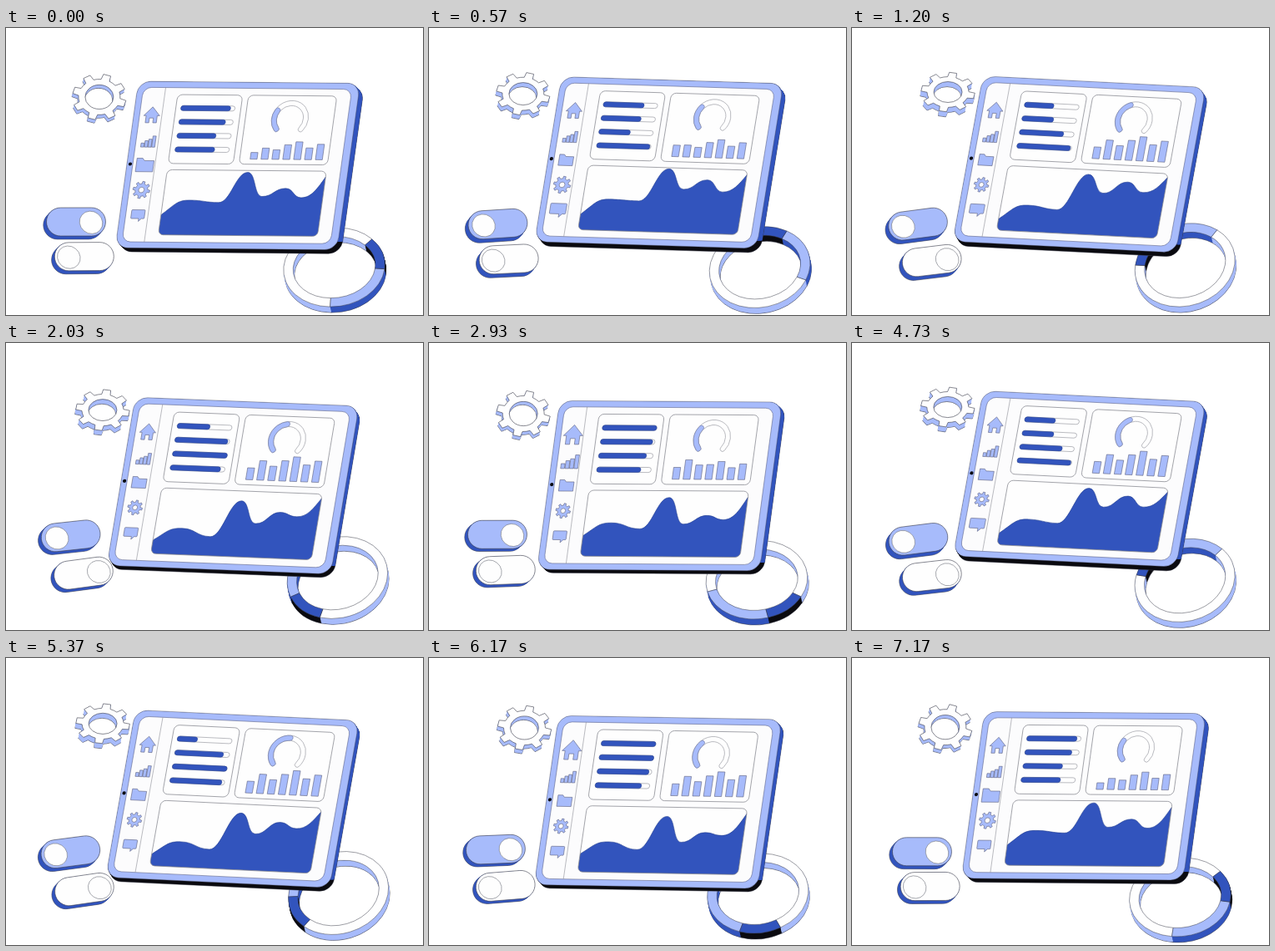
An HTML page with a canvas for the animation above (7210 ms loop, 500 by 345 pixels).

```html
<!DOCTYPE html>
<html lang="en">
<head>
<meta charset="utf-8">
<title>Floating dashboard</title>
<style>
  html, body { margin: 0; width: 100%; height: 100%; overflow: hidden; background: #fff; }
  canvas { display: block; width: 500px; height: 345px; }
</style>
</head>
<body>
<canvas id="stage"></canvas>
<script>
const PERIOD = 3605;
const TAU = Math.PI * 2, DEG = Math.PI / 180;
const WHITE = '#fefefe', LIGHT = '#a7bbfb', BLUE = '#3254bd', BLACK = '#0b0b10';
const LINE = '#3a3c48', GREY = '#8c8d95';

const canvas = document.getElementById('stage');
const ctx = canvas.getContext('2d');
const ratio = window.devicePixelRatio || 1;
canvas.width = 500 * ratio;
canvas.height = 345 * ratio;

// Timing helpers; p is the phase of the loop, 0 to 1.
const wave = (p, mid, amp, peak) => mid + amp * Math.cos(TAU * (p - peak));
const clamp = (v, lo = 0, hi = 1) => Math.min(hi, Math.max(lo, v));
const smooth = v => { v = clamp(v); return v * v * (3 - 2 * v); };
const ramp = (p, from, to) => smooth((p - from) / (to - from));

// Smooth periodic curve through [phase, value] keys.
function track(p, keys) {
  const n = keys.length;
  const at = i => {
    const turn = Math.floor(i / n), k = keys[i - turn * n];
    return [k[0] + turn, k[1]];
  };
  let i = n - 1;
  while (i > 0 && keys[i][0] > p) i--;
  const [a, b, c, d] = [at(i - 1), at(i), at(i + 1), at(i + 2)];
  const h = c[0] - b[0], s = (p - b[0]) / h, s2 = s * s, s3 = s2 * s;
  const m0 = (c[1] - a[1]) / (c[0] - a[0]) * h;
  const m1 = (d[1] - b[1]) / (d[0] - b[0]) * h;
  return (2 * s3 - 3 * s2 + 1) * b[1] + (s3 - 2 * s2 + s) * m0
       + (3 * s2 - 2 * s3) * c[1] + (s3 - s2) * m1;
}

// Path helpers
const shape = d => new Path2D(d);
function rect(x, y, w, h, r = 0) {
  const path = new Path2D();
  path.roundRect(x, y, w, h, r);
  return path;
}
function ellipse(x, y, rx, ry, turn = 0) {
  const path = new Path2D();
  path.ellipse(x, y, rx, ry, turn, 0, TAU);
  return path;
}
function put(path, matrix) {
  const placed = new Path2D();
  placed.addPath(path, matrix);
  return placed;
}
function paint(path, fill, line, width = 0.6) {
  if (fill) { ctx.fillStyle = fill; ctx.fill(path, 'evenodd'); }
  if (line) { ctx.strokeStyle = line; ctx.lineWidth = width; ctx.stroke(path); }
}
function extrude(path, dx, dy, fill, outline = true) {
  const steps = Math.ceil(Math.hypot(dx, dy) * 1.5);
  for (let i = steps; i > 0; i--) {
    ctx.save();
    ctx.translate(dx * i / steps, dy * i / steps);
    paint(path, fill, outline && i === steps ? LINE : null);
    ctx.restore();
  }
}
function gearPath(outer, root, hole, turn) {
  const path = new Path2D();
  for (let i = 0; i < 8; i++) {
    const a = turn + i * 45;
    path.arc(0, 0, root, (a - 33) * DEG, (a - 12) * DEG);
    for (const side of [-8, 8]) {
      path.lineTo(outer * Math.cos((a + side) * DEG), outer * Math.sin((a + side) * DEG));
    }
  }
  path.closePath();
  path.moveTo(hole, 0);
  path.arc(0, 0, hole, 0, TAU);
  path.closePath();
  return path;
}

function ringPart(from, to, ry) {
  const path = new Path2D();
  path.ellipse(0, 0, 61, ry, 0, from * DEG, to * DEG);
  path.ellipse(0, 0, 49.5, ry - 10.5, 0, to * DEG, from * DEG, true);
  path.closePath();
  return path;
}
function drawRing(p) {
  const ry = wave(p, 48, 1, 0.39);
  const place = new DOMMatrix()
    .translate(wave(p, 396, 3.4, 0.38), wave(p, 285, 3, 0.08))
    .rotate(wave(p, -12, -6, 0.39));
  const turn = wave(p, 4, 3, 0.75) - 360 * p;
  const split = wave(p, 90, 8, -0.1);
  // [start, end, face colour, side colour]
  const parts = [
    [split, 320, WHITE, LIGHT],
    [8, split, LIGHT, BLUE],
    [-40, 8, BLUE, BLACK]
  ].map(([from, to, face, side]) =>
    ({ path: put(ringPart(from + turn, to + turn, ry), place), face, side }));
  const steps = 10, dx = 1.5, dy = 7;
  for (let i = steps; i > 0; i--) {
    ctx.save();
    ctx.translate(dx * i / steps, dy * i / steps);
    for (const s of parts) paint(s.path, s.side, i === steps ? LINE : null);
    ctx.restore();
  }
  for (const s of parts) paint(s.path, s.face, LINE, 0.5);
}

function drawGear(p) {
  const tilt = wave(p, 0.8, 0.07, -0.1);
  const place = new DOMMatrix([1, 0, 0, tilt, wave(p, 114, -2.1, 0), wave(p, 81, -4, 0.33)]);
  const path = put(gearPath(32.3, 25, 17, wave(p, 13, 4, 0)), place);
  extrude(path, -1, wave(p, 5, -1.2, -0.1), LIGHT);
  paint(path, WHITE, LINE);
}

function drawToggle(p, x, y, angle, knob, fill) {
  const place = new DOMMatrix().translate(x, y).rotate(angle);
  const body = put(rect(-35.5, -17, 71, 34, 17), place);
  extrude(body, -3.7, wave(p, 3.9, 0.8, 0.25), BLUE);
  paint(body, fill, LINE);
  paint(put(ellipse(knob, 0.8, 14.2, 13.2, 0.7), place), WHITE, '#6b6d78');
}
function drawToggles(p) {
  const first = 18 - 36 * (ramp(p, 0.05, 0.17) - ramp(p, 0.55, 0.67));
  const second = -18.5 + 37 * (ramp(p, 0.16, 0.28) - ramp(p, 0.56, 0.68));
  drawToggle(p, wave(p, 80.7, 3.3, 0), wave(p, 233, 3, 0.25),
    wave(p, -3.7, -4.3, 0.41), first, LIGHT);
  drawToggle(p, wave(p, 93.8, 2.2, 0.25), wave(p, 276.3, 3.3, 0.33),
    wave(p, -4.3, -4, 0.47), second, WHITE);
}

// Tablet parts, in the flat coordinates of the screen
const FRAME = rect(-49.3, -15.5, 266, 199.5, 15);
const SCREEN = rect(-42.2, -8.3, 250, 185, 10);
const CARDS = [rect(0, 0, 78, 82.5, 6), rect(85, 0, 106, 82.5, 6), rect(0, 90, 191, 78, 6)];

const bars = new Path2D();
[5, 8, 10, 14].forEach((h, i) => bars.rect(-8.5 + i * 4.6, 7 - h, 4, h));
// [shape, y, phase of the pulse]
const ICONS = [
  [shape('M0-10L10 1H7V10H2.5V4H-2.5V10H-7V1H-10Z'), 24.5, 0.76],
  [bars, 56.5, 0.85],
  [shape('M-9-7H-3L-1-4.5H9V7H-9Z'), 84.6, 0.97],
  [gearPath(9.3, 6.8, 3, 10), 114.5, 0.08],
  [shape('M-7.5-6.5H7.5Q8.5-6.5 8.5-5.5V3.5Q8.5 4.5 7.5 4.5H5L1.5 8V4.5H-7.5Q-8.5 4.5-8.5 3.5V-5.5Q-8.5-6.5-7.5-6.5Z'), 144.5, 0.22]
];

const ROWS = [
  [[0, .92], [.118, .8], [.333, .54], [.49, .37], [.65, .95], [.711, 1], [.813, 1]],
  [[0, .86], [.118, .78], [.333, .58], [.49, .89], [.62, 1], [.711, 1], [.813, .96]],
  [[0, .72], [.118, .61], [.16, .58], [.333, .81], [.46, 1], [.711, .95], [.813, .88]],
  [[0, .73], [.118, .94], [.2, 1], [.333, .98], [.49, .95], [.711, .85], [.813, .81]]
];
const GAUGE = [[0, .28], [.118, .29], [.333, .42], [.49, .51], [.711, .34], [.813, .31]];
// [full height, lowest share]
const COLUMNS = [[14, .57], [23, .58], [17, .67], [24, .73], [29, .73], [20, .7], [25, .74]];
// [x, middle y, swing, phase of the swing]
const HILLS = [
  [0, 149, 6, .4], [32, 132, 6, .46], [67, 137, 8.5, .53], [97, 96.5, 5.5, .61],
  [118, 123, 8, .71], [145, 110.5, 9, .76], [165, 119, 5, .85], [191, 95.7, 1.5, .9]
];

function drawIcons(p, plane) {
  for (const [path, y, peak] of ICONS) {
    const gap = Math.abs(p - peak - Math.round(p - peak));
    const size = 0.95 + 0.2 * smooth(1.5 - gap / 0.1);
    paint(put(path, plane.translate(-27.6, y).scale(size)), LIGHT, '#5b5f7c');
  }
}
function drawRows(p, plane) {
  ROWS.forEach((keys, i) => {
    const y = 13.1 + i * 16.5, full = 65;
    paint(put(rect(6, y, full, 6, 3), plane), WHITE, GREY);
    paint(put(rect(6, y, full * clamp(track(p, keys)), 6, 3), plane), BLUE, '#26418f', 0.5);
  });
}
function gaugeArc(to) {
  const r = 19, w = 3, start = 140 * DEG, end = (140 + 260 * to) * DEG;
  const path = new Path2D();
  const cap = (a, s) => path.arc(138.5 + r * Math.cos(a), 28 + r * Math.sin(a), w, s, s + Math.PI);
  path.arc(138.5, 28, r + w, start, end);
  cap(end, end);
  path.arc(138.5, 28, r - w, end, start, true);
  cap(start, start + Math.PI);
  path.closePath();
  return path;
}
function drawGauge(p, plane) {
  paint(put(gaugeArc(1), plane), WHITE, GREY);
  paint(put(gaugeArc(track(p, GAUGE)), plane), LIGHT, '#6d7499');
}
function drawColumns(p, plane) {
  COLUMNS.forEach(([full, low], i) => {
    const rise = i ? 0.2 : 0.1, fall = i < 3 ? 0.89 : 0.77;
    const up = ramp(p, rise - 0.07, rise + 0.07) - ramp(p, fall - 0.05, fall + 0.05);
    const h = full * (low + (1 - low) * up);
    paint(put(rect(97.5 + i * 13.05, 76.4 - h, 8.3, h), plane), LIGHT, '#5b5f7c');
  });
}
function drawHills(p, plane) {
  const pts = HILLS.map(([x, mid, amp, peak]) => [x, wave(p, mid, amp, peak)]);
  const path = new Path2D();
  const last = pts.length - 1;
  path.moveTo(...pts[0]);
  for (let i = 1; i <= last; i++) {
    const [x0, y0] = pts[i - 1], [x1, y1] = pts[i], half = (x1 - x0) * 0.48;
    const c0 = i === 1 ? y0 + (y1 - y0) * 0.7 : y0;
    const c1 = i === last ? y1 + (y0 - y1) * 0.55 : y1;
    path.bezierCurveTo(x0 + half, c0, x1 - (i === last ? 8 : half), c1, x1, y1);
  }
  path.lineTo(191, 168);
  path.lineTo(0, 168);
  path.closePath();
  ctx.save();
  ctx.clip(put(CARDS[2], plane));
  paint(put(path, plane), BLUE, '#26418f');
  ctx.restore();
}
function drawTablet(p) {
  const plane = new DOMMatrix([
    wave(p, 191.8, -0.9, 0.05) / 191, wave(p, 5.4, 4.7, 0.39) / 191,
    wave(p, -26.6, -4.2, 0.39) / 168, wave(p, 169, -2.2, 0.22) / 168,
    wave(p, 204, 2, 0.06), wave(p, 80.4, -5.6, 0.24)
  ]);
  const frame = put(FRAME, plane);
  const dx = wave(p, 3.8, 0.9, 0), dy = wave(p, 4.6, 0.7, 0.25);
  extrude(frame, dx, dy, BLACK);
  ctx.save();
  ctx.clip(put(rect(-80, -40, 330, 214), plane));
  extrude(frame, dx, dy, BLUE, false);
  ctx.restore();
  paint(frame, LIGHT, LINE, 0.4);
  paint(put(SCREEN, plane), '#fcfcfd', '#5d638a');
  paint(put(ellipse(-45.3, 83.6, 2.1, 2.1), plane), BLACK);
  paint(put(shape('M-15.5-8.3V176.7'), plane), null, GREY);
  drawIcons(p, plane);
  for (const card of CARDS) paint(put(card, plane), WHITE);
  drawHills(p, plane);
  for (const card of CARDS) paint(put(card, plane), null, GREY, 0.8);
  drawRows(p, plane);
  drawGauge(p, plane);
  drawColumns(p, plane);
}

function draw() {
  const p = performance.now() % PERIOD / PERIOD;
  ctx.setTransform(ratio, 0, 0, ratio, 0, 0);
  ctx.fillStyle = '#fff';
  ctx.fillRect(0, 0, 500, 345);
  ctx.lineJoin = 'round';
  drawRing(p);
  drawGear(p);
  drawToggles(p);
  drawTablet(p);
  requestAnimationFrame(draw);
}
draw();
</script>
</body>
</html>
```
